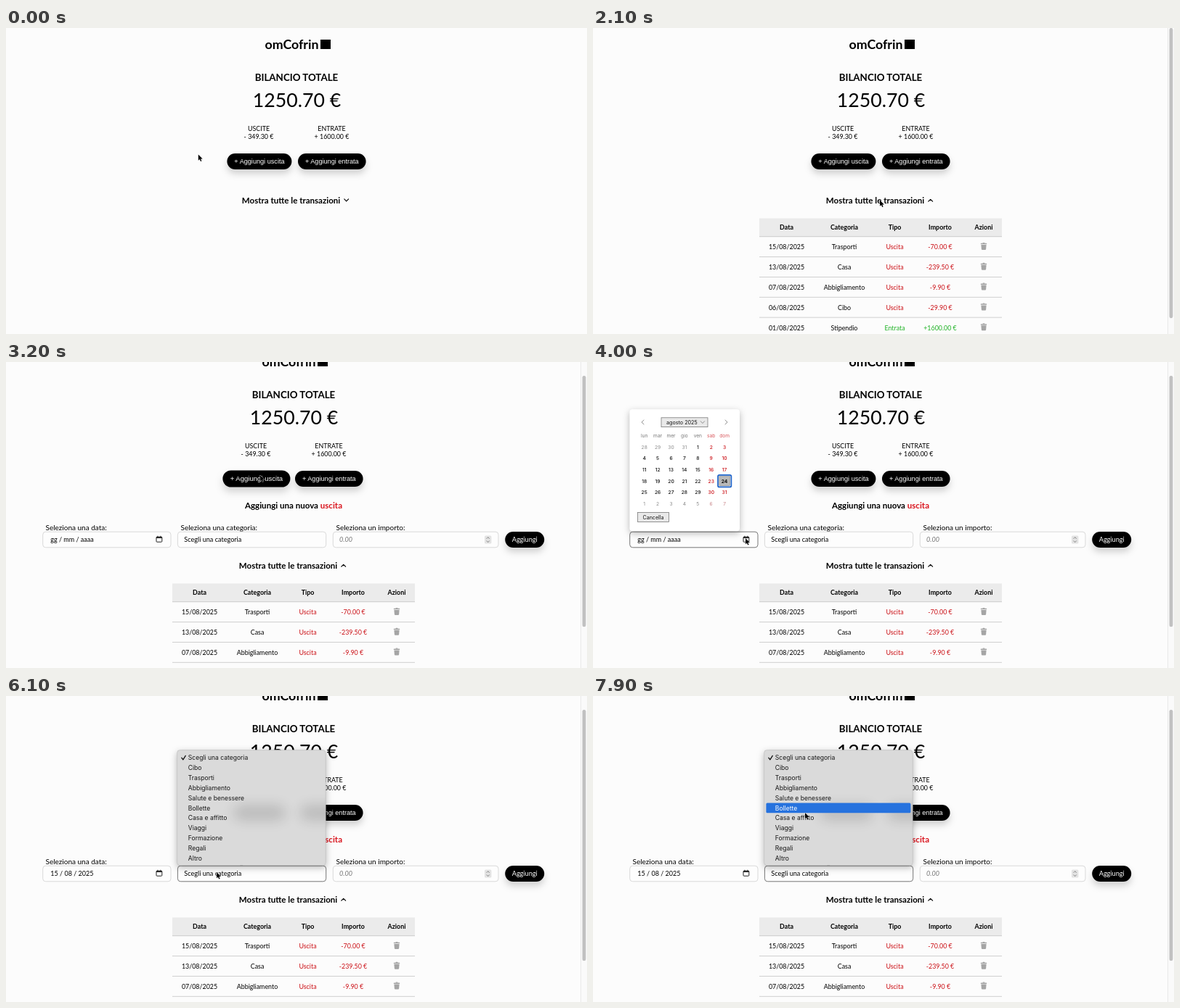
Animation of 800 by 422 pixels, one loop 8 s. Source, as an HTML page:

```html
<!DOCTYPE html>
<html lang="it">
<head>
<meta charset="utf-8">
<title>omCofrin</title>
<style>
html, body { margin: 0; width: 100%; height: 100%; overflow: hidden; background: #fcfcfc; }
svg { display: block; width: 800px; height: 422px; font-family: Lato, sans-serif; }
.shadow { filter: drop-shadow(0 6px 5px rgba(0,0,0,.17)); }
.popup { filter: drop-shadow(0 3px 5px rgba(0,0,0,.28)); }
.ui { font-family: Inter, Roboto, sans-serif; }
</style>
</head>
<body>
<svg id="stage" viewBox="0 0 800 422" xmlns="http://www.w3.org/2000/svg"></svg>
<script>
const NS = 'http://www.w3.org/2000/svg';
const stage = document.getElementById('stage');
const RED = '#cb1016', GREEN = '#1fb225', ROOT = 8.89;

function el(parent, tag, attrs = {}, content) {
  const node = document.createElementNS(NS, tag);
  for (const key in attrs) node.setAttribute(key, attrs[key]);
  if (content !== undefined) node.textContent = content;
  return parent.appendChild(node);
}
const group = (parent, attrs) => el(parent, 'g', attrs);
const rect = (parent, x, y, width, height, fill, attrs) =>
  el(parent, 'rect', { x, y, width, height, fill, ...attrs });
const line = (parent, d, stroke, width = 1) =>
  el(parent, 'path', { d, stroke, fill: 'none', 'stroke-width': width,
    'stroke-linecap': 'round', 'stroke-linejoin': 'round' });
const label = (parent, x, y, text, size = ROOT, attrs = {}) =>
  el(parent, 'text', { x, y, 'font-size': size, ...attrs }, text);
const centred = (parent, x, y, text, size, attrs) =>
  label(parent, x, y, text, size, { 'text-anchor': 'middle', ...attrs });
const show = (node, on) => node.setAttribute('display', on ? 'inline' : 'none');
const move = (node, x, y) => node.setAttribute('transform', `translate(${x} ${y})`);
const BOLD = { 'font-weight': 700 };

// Header and balance
const page = group(stage);
label(page, 430.5, 28.7, 'omCofrin', 17.78, { ...BOLD, 'text-anchor': 'end' });
rect(page, 433, 16, 14, 13, '#000');
centred(page, 400, 73, 'BILANCIO TOTALE', 13.33, BOLD);
centred(page, 400.5, 109.3, '1250.70 €', 26.67);
centred(page, 348, 142.2, 'USCITE');
centred(page, 348, 153, '- 349.30 €');
centred(page, 448.5, 142.2, 'ENTRATE');
centred(page, 448.5, 153, '+ 1600.00 €');

function pill(parent, x, y, width, text, size, font) {
  const g = group(parent, { class: 'shadow' });
  rect(g, x, y, width, 22, '#000', { rx: 11 });
  centred(g, x + width / 2, y + 14.3, text, size,
    { fill: '#fff', 'font-family': font });
  return g;
}
const UI_FONT = 'Liberation Sans, Arial, sans-serif';
const addExpense = pill(page, 304.4, 173, 89, '+ Aggiungi uscita', 9.15, UI_FONT);
pill(page, 402, 173, 93.6, '+ Aggiungi entrata', 9.15, UI_FONT);

// Transactions
const list = group(page);
label(list, 324.8, 242, 'Mostra tutte le transazioni', 11.56, BOLD);
const arrowDown = line(list, 'M465.8 235.9l2.9 2.9 2.9-2.9', '#000', 1.2);
const arrowUp = line(list, 'M465.8 239.2l2.9-2.9 2.9 2.9', '#000', 1.2);

const table = group(list);
const COLS = [270.5, 350, 419.5, 482, 542];
rect(table, 233, 262.5, 334, 25, '#ebebeb');
rect(table, 233, 287.2, 334, 1, '#cbcbcb');
['Data', 'Categoria', 'Tipo', 'Importo', 'Azioni'].forEach((name, i) =>
  centred(table, COLS[i], 278.2, name, ROOT, BOLD));

function bin(x, y) {
  const g = group(table, { fill: '#a5a5a5' });
  rect(g, x - 4.2, y - 4.3, 8.4, 1.5, '#a5a5a5', { rx: .5 });
  rect(g, x - 1.5, y - 5.2, 3, 1.2, '#a5a5a5', { rx: .5 });
  el(g, 'path', { d: `M${x - 3.6} ${y - 2.2}h7.2l-.5 6q-.1 1-1.1 1h-4q-1 0-1.1-1z` });
}
[
  ['15/08/2025', 'Trasporti', '-70.00 €'],
  ['13/08/2025', 'Casa', '-239.50 €'],
  ['07/08/2025', 'Abbigliamento', '-9.90 €'],
  ['06/08/2025', 'Cibo', '-29.90 €'],
  ['01/08/2025', 'Stipendio', '+1600.00 €']
].forEach(([date, category, amount], i) => {
  const y = 305.1 + i * 27.85;
  const income = amount[0] === '+';
  const fill = income ? GREEN : RED;
  centred(table, COLS[0], y, date);
  centred(table, COLS[1], y, category);
  centred(table, COLS[2], y, income ? 'Entrata' : 'Uscita', ROOT, { fill });
  centred(table, COLS[3], y, amount, ROOT, { fill });
  bin(COLS[4], y - 4);
  rect(table, 233, y + 10, 334, 1, '#cfcfcf');
});

// Expense form, placed in window coordinates
const form = group(stage);
const heading = centred(form, 396, 201.5, 'Aggiungi una nuova ', 11.56, BOLD);
el(heading, 'tspan', { fill: '#d9141d' }, 'uscita');
label(form, 54.5, 231.6, 'Seleziona una data:', 10);
label(form, 240.5, 231.6, 'Seleziona una categoria:', 10);
label(form, 454.5, 231.6, 'Seleziona un importo:', 10);
const field = (x, width) =>
  rect(form, x, 234.2, width, 21.6, '#fdfdfd', { rx: 4, stroke: '#d9d9d9' });
const dateField = field(50.7, 176.3);
const categoryField = field(236.4, 204.3);
field(450.3, 227.7);
const dateText = label(form, 61.3, 248.2, '', 9);
label(form, 245.3, 248.2, 'Scegli una categoria', 9.1);
label(form, 459, 248.2, '0.00', 9.1, { 'font-style': 'italic', fill: '#777' });
rect(form, 207, 241.2, 7.8, 7, 'none', { rx: .9, stroke: '#222', 'stroke-width': 1 });
rect(form, 207, 241.2, 7.8, 1.8, '#222');
line(form, 'M208.9 240.2v1M212.9 240.2v1', '#222');
rect(form, 659, 239.5, 9.4, 11, '#e3e3e3', { rx: 1.5 });
line(form, 'M662 243.4l1.7-1.8 1.7 1.8M662 246.8l1.7 1.8 1.7-1.8', '#777', .9);
pill(form, 687.2, 234, 54, 'Aggiungi', 9.15, 'Lato, sans-serif');

// Date picker
const DAY = { x: 70.7, y: 117.5, dx: 18.4, dy: 15.55 };
const picker = group(stage, { class: 'ui' });
rect(picker, 50.4, 65.2, 151.6, 168, '#fff', { rx: 4, class: 'popup' });
line(picker, 'M70 80l-3 3 3 3M182 80l3 3-3 3', '#777', .8);
rect(picker, 94, 76.8, 64, 12.8, '#e9e9e9', { stroke: '#7a7a7a', 'stroke-width': .8 });
label(picker, 101, 85.6, 'agosto 2025', 7.2, { fill: '#111' });
line(picker, 'M148.2 81.7l2.7 2.8 2.7-2.8', '#777', .8);
['lun', 'mar', 'mer', 'gio', 'ven', 'sab', 'dom'].forEach((name, i) =>
  centred(picker, DAY.x + i * DAY.dx, 104.2, name, 6.6, { fill: i > 4 ? '#d8555a' : '#777' }));
const dayHover = rect(picker, -8.2, -7.2, 16.4, 14.2, '#bdbdbd',
  { stroke: '#8a8a8a', 'stroke-width': .8 });
rect(picker, 172, 155.8, 18.4, 16.6, '#fff', { rx: 2, stroke: '#1c62c9', 'stroke-width': 1.7 });
rect(picker, 173.8, 157.6, 14.8, 13, '#b9b9b9', { stroke: '#888', 'stroke-width': .6 });
for (let i = 0; i < 42; i++) {
  const col = i % 7, row = Math.floor(i / 7), n = i - 3;
  const outside = n < 1 || n > 31;
  const day = n < 1 ? n + 31 : n > 31 ? n - 31 : n;
  const fill = outside ? (col > 4 ? '#c9868a' : '#8a8a8a') : col > 4 && n !== 24 ? RED : '#111';
  centred(picker, DAY.x + col * DAY.dx, DAY.y + row * DAY.dy + 2.4, day, 6.7,
    { fill, 'font-weight': n === 24 && !outside ? 700 : outside ? 400 : 500 });
}
rect(picker, 61.4, 207.4, 43, 13, '#e9e9e9', { stroke: '#7a7a7a', 'stroke-width': .8 });
centred(picker, 83, 216.5, 'Cancella', 7.1, { fill: '#111' });

// Category menu
const ITEM_H = 13.88;
const menu = group(stage, { class: 'ui' });
rect(menu, 235.6, 74.6, 204.6, 159, '#dadada',
  { rx: 4, class: 'popup', stroke: '#bdbdbd', 'stroke-width': .6 });
const clip = el(el(stage, 'defs'), 'clipPath', { id: 'menuClip' });
rect(clip, 236, 75, 204, 158, '#000', { rx: 4 });
const haze = group(menu, { 'clip-path': 'url(#menuClip)' });
[[349, 72], [440, 70]].forEach(([x, width]) =>
  rect(haze, x - width / 2, 151, width, 20, '#000',
    { rx: 10, opacity: .15, style: 'filter:blur(9px)' }));
const menuHover = rect(menu, 238.4, 78.2, 199, ITEM_H - .3, '#2672de', { rx: 1.5 });
line(menu, 'M241.8 85.2l2 2.6 3.4-5.4', '#111', 1.3);
const items = ['Scegli una categoria', 'Cibo', 'Trasporti', 'Abbigliamento', 'Salute e benessere',
  'Bollette', 'Casa e affitto', 'Viaggi', 'Formazione', 'Regali', 'Altro'
].map((name, i) => label(menu, 250.8, 88.1 + i * ITEM_H, name, 8.55));

// Scrollbar
const bar = group(stage);
rect(bar, 791, 0, 9, 422, '#fafafa');
rect(bar, 791, 0, 1, 422, '#e9e9e9');
const thumb = rect(bar, 793.6, 0, 4.8, 400, '#c1c1c1', { rx: 2.4 });

const cursor = el(stage, 'path', {
  d: 'M0 0V8.2L1.9 6.5 3.2 9.4 4.6 8.8 3.3 6H5.9Z',
  fill: '#000', stroke: '#fff', 'stroke-width': .7, 'paint-order': 'stroke'
});

const PATH = [
  [0, 264.8, 174.6], [300, 264.8, 174.6], [1200, 394, 231.8], [1500, 394, 232.2],
  [2000, 395, 237.6], [2300, 395, 237.6], [2900, 350, 156], [3200, 350, 156],
  [3700, 211, 244], [4000, 210, 243], [4800, 146, 149], [5200, 146, 149],
  [5800, 290, 243], [6100, 290, 243], [6600, 305, 204], [6700, 305, 204],
  [7200, 296, 178], [7500, 296, 178], [7900, 292, 161], [8000, 292, 161]
];
const OPEN = 1600, FORM = 3200, PICK = 3800, PICKED = 5300, MENU = 6000;

function cursorAt(t) {
  const i = PATH.findIndex(p => p[0] > t);
  const [t0, x0, y0] = PATH[i - 1], [t1, x1, y1] = PATH[i];
  const u = (t - t0) / (t1 - t0), k = u * u * (3 - 2 * u);
  return [x0 + (x1 - x0) * k, y0 + (y1 - y0) * k];
}

function draw(t) {
  const [cx, cy] = cursorAt(t);
  const open = t >= OPEN, hasForm = t >= FORM;
  const scroll = t < 2200 ? 0 : t < 2300 ? 12 : 23;
  move(cursor, cx, cy);
  move(page, open ? -4 : 0, -scroll);
  move(list, 0, hasForm ? 66 : 0);
  show(table, open);
  show(arrowUp, open);
  show(arrowDown, !open);
  show(form, hasForm);

  show(bar, open);
  const height = 422 * 422 / (hasForm ? 514 : 445);
  thumb.setAttribute('height', height);
  thumb.setAttribute('y', scroll * height / 422);

  const over = t > 2300 && t < 4000 && cx > 300 && cx < 389 && cy > 150 && cy < 172;
  addExpense.setAttribute('transform', over
    ? 'translate(348.9 184) scale(1.045) translate(-348.9 -184)' : '');

  const picking = t >= PICK && t < PICKED;
  show(picker, picking);
  const col = Math.round((cx - DAY.x) / DAY.dx), row = Math.round((cy - DAY.y) / DAY.dy);
  show(dayHover, picking && col >= 0 && col < 7 && row >= 0 && row < 6);
  move(dayHover, DAY.x + col * DAY.dx, DAY.y + row * DAY.dy);
  dateText.textContent = t < PICKED ? 'gg / mm / aaaa' : '15 / 08 / 2025';
  dateField.setAttribute('stroke', t >= PICK && t < MENU ? '#777' : '#d9d9d9');

  const menuOpen = t >= MENU;
  show(menu, menuOpen);
  categoryField.setAttribute('stroke', menuOpen ? '#777' : '#d9d9d9');
  const active = Math.floor((cy - 78.1) / ITEM_H);
  const valid = active >= 0 && active < items.length;
  show(menuHover, valid);
  if (valid) move(menuHover, 0, active * ITEM_H);
  items.forEach((item, i) => item.setAttribute('fill', i === active ? '#fff' : '#161616'));
}

function tick() {
  draw(Math.floor(performance.now() % 8000 / 100) * 100);
  requestAnimationFrame(tick);
}
tick();
</script>
</body>
</html>
```
